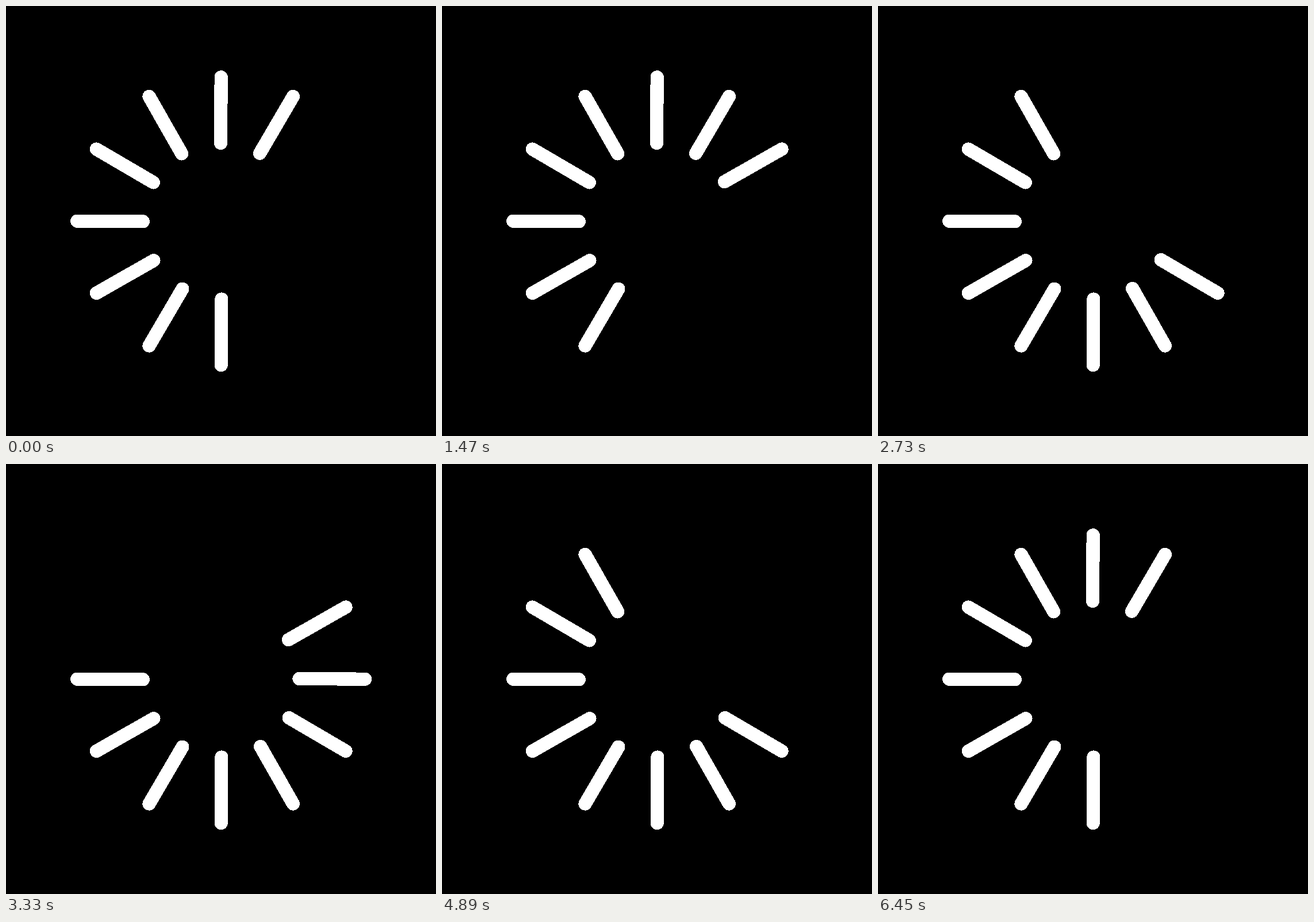
An HTML page that plays this animation: 748 px wide and 748 px high, repeating every 6.48 s.

```html
<!DOCTYPE html>
<html lang="en">
<head>
<meta charset="utf-8">
<title>Spinner</title>
<style>
  html, body { margin: 0; width: 100%; height: 100%; overflow: hidden; background: #000; }
  svg { display: block; width: 100%; height: 100%; }
  line { stroke: #fff; stroke-width: 23.2; stroke-linecap: round; shape-rendering: crispEdges; }
</style>
</head>
<body>
<svg viewBox="0 0 748 748"><g id="spinner" transform="translate(374.2 374.2)"></g></svg>
<script>
const SPOKES = 12, VISIBLE = 8, STEP_MS = 60, LOOP_MS = 6480;
const spinner = document.getElementById('spinner');

// Each spoke leans slightly: its inner end sits a little counterclockwise.
const spokes = Array.from({ length: SPOKES }, (_, i) => {
  const line = document.createElementNS('http://www.w3.org/2000/svg', 'line');
  const angle = i * 2 * Math.PI / SPOKES, sin = Math.sin(angle), cos = Math.cos(angle);
  const place = (end, radius, lean) => {
    line.setAttribute('x' + end, radius * sin + lean * cos);
    line.setAttribute('y' + end, -radius * cos + lean * sin);
  };
  place(1, 250.4, 0);
  place(2, 135.8, -0.7);
  spinner.append(line);
  return line;
});

function render(ms) {
  const step = Math.floor((ms % LOOP_MS + STEP_MS / 2) / STEP_MS);
  const head = (step + 1) % SPOKES;
  spokes.forEach((line, i) => {
    const behind = (head - i + SPOKES) % SPOKES;
    line.setAttribute('visibility', behind < VISIBLE ? 'visible' : 'hidden');
  });
}

const start = performance.now();
function tick() {
  render(performance.now() - start);
  requestAnimationFrame(tick);
}
render(0);
requestAnimationFrame(tick);
</script>
</body>
</html>
```
